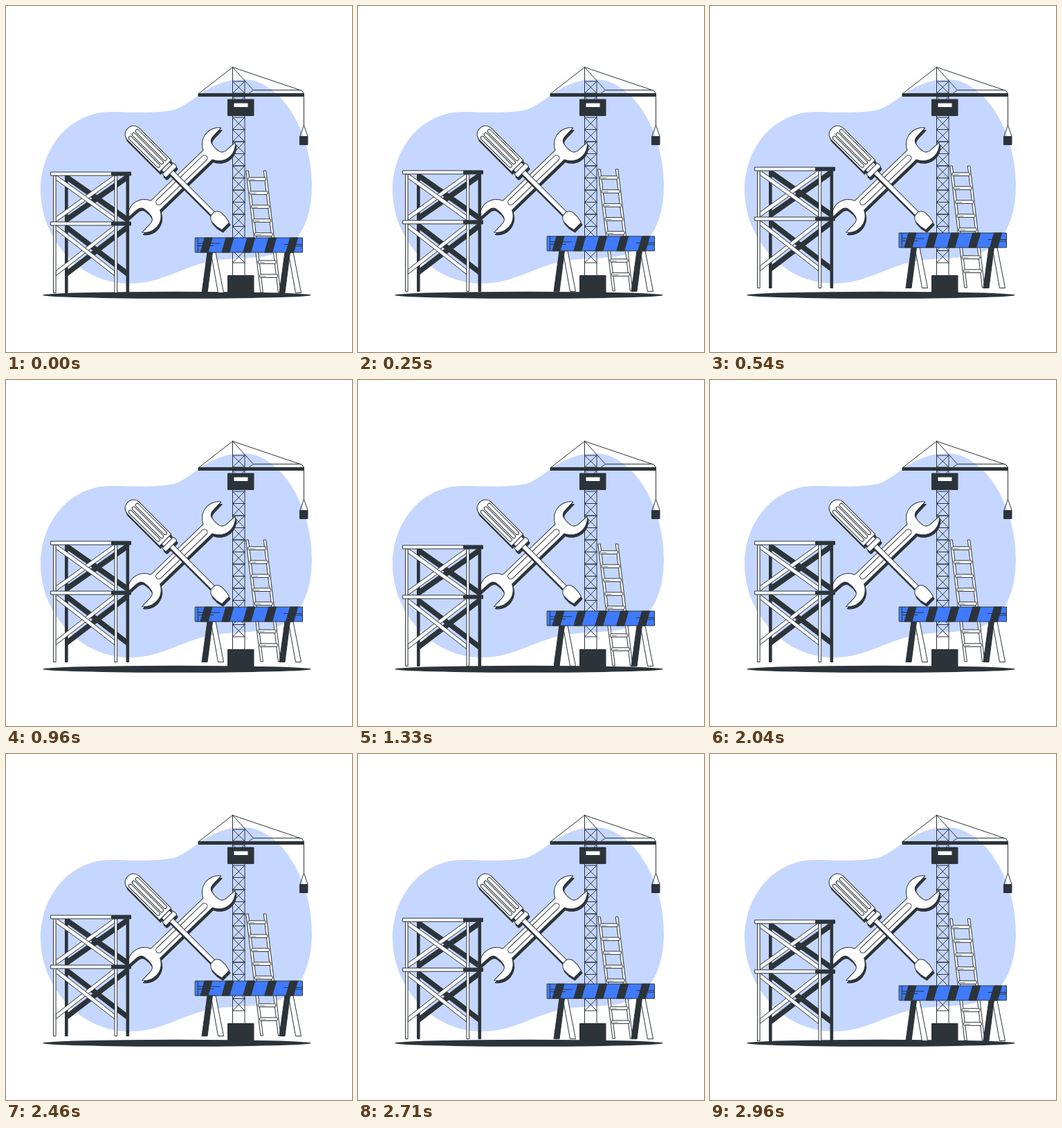
Animation, 500 px wide and 500 px high, one loop 3000 ms. Source, as an HTML page:

```html
<!DOCTYPE html>
<html lang="en">
<head>
<meta charset="utf-8">
<title>Construction site</title>
<style>
  html, body { margin: 0; width: 100%; height: 100%; overflow: hidden; background: #fff; }
  svg { display: block; width: 100vw; height: 100vh; }
  .line { fill: none; stroke: #2c343a; stroke-linejoin: round; stroke-linecap: round; }
  .white { fill: #fff; stroke: #2c343a; stroke-linejoin: round; }
  .dark { fill: #2c343a; stroke: #2c343a; stroke-linejoin: round; }
</style>
</head>
<body>
<svg viewBox="0 0 500 500">
  <path fill="#c5d7ff" d="M50 266C50 205 92 153 152 153C180 153 215 156 243 150C272 141 292 106 343 106C396 106 442 180 442 258C442 315 420 358 365 363C325 366 300 364 262 379C235 389 212 401 178 401C105 401 50 335 50 266Z"/>
  <ellipse cx="247" cy="417.8" rx="194" ry="5" fill="#2c343a"/>
  <g id="crane"></g>
  <g id="tools"></g>
  <g id="floating"></g>
</svg>
<script>
const PERIOD = 1500, LIFT = 8.5;
const byId = id => document.getElementById(id);

const path = (cls, d) => `<path class="${cls}" d="${d}"/>`;
const poly = (cls, ...pts) => path(cls, `M${pts.join('L')}Z`);
const line = (...pts) => path('line', `M${pts.join('L')}`);
const rect = (cls, x, y, w, h, r = 0) =>
  `<rect class="${cls}" x="${x}" y="${y}" width="${w}" height="${h}" rx="${r}"/>`;
const group = (transform, content) => `<g transform="${transform}">${content}</g>`;
const withShadow = (transform, draw) =>
  group(`translate(1.5 3.5) ${transform}`, draw('dark')) + group(transform, draw('white'));

function crane() {
  const left = 327.5, right = 345, step = 17.5;
  let out = line([left, 88], [left, 389]) + line([right, 108], [right, 389]);
  const bay = (top, bottom) =>
    line([left, top], [right, top]) + line([left, bottom], [right, bottom]) +
    line([left, top], [right, bottom]) + line([right, top], [left, bottom]);
  out += bay(109, 126);
  out += bay(131, 148);
  for (let i = 0; i < 12; i++) out += bay(161 + i * step, 161 + (i + 1) * step);
  out += line([278, 127], [327.5, 88.5], [428, 122.5], [430.5, 127]);
  out += line([327.5, 88.5], [357.5, 121.5], [426, 121.5]) + line([357.5, 121.5], [350, 127]);
  out += rect('dark', 278, 126.5, 152.5, 4);
  out += line([430.5, 131], [430.5, 172], [425, 188]) + line([430.5, 172], [436, 188]);
  out += rect('dark', 424.5, 188.5, 11.5, 12);
  out += rect('dark', 320.5, 135, 37.5, 23.5) + rect('white', 329, 140, 21, 6.5);
  return out + rect('dark', 320.5, 389.5, 37.5, 26);
}

function wrench() {
  // The second jaw is the first one turned by half a circle
  const jaw = s => [
    `L${52.5 * s} ${9.5 * s}A24 24 0 0 0 ${93.5 * s} ${14.7 * s}`,
    `L${78 * s} ${14 * s}Q${70 * s} ${14 * s} ${68 * s} ${8 * s}`,
    `L${67 * s} 0L${68 * s} ${-8 * s}Q${70 * s} ${-14 * s} ${78 * s} ${-14 * s}`,
    `L${93.5 * s} ${-14.7 * s}A24 24 0 0 0 ${52.5 * s} ${-9.5 * s}`
  ].join('');
  const outline = `M-52.5 9.5${jaw(1)}${jaw(-1)}Z`;
  return withShadow('translate(253.8 251.6) rotate(-44)', cls =>
    path(cls, outline) + rect(cls, -50, -4.2, 100, 8.4, 4.2));
}

function screwdriver() {
  return withShadow('translate(239.5 240.5) rotate(45)', cls => {
    let out = rect(cls, -2, -3.5, 88, 7) +
      path(cls, 'M84 -3.5Q87 -9 92 -9.5L101 -9.5L110 -7.5V7.5L101 9.5L92 9.5Q87 9 84 3.5Z') +
      rect(cls, -13, -8, 6, 16) + rect(cls, -8, -11.5, 7.5, 23, 2) +
      path(cls, 'M-13 12H-80Q-90 10 -90 0Q-90 -10 -80 -12H-13Z');
    for (const y of [-7, 0, 7]) out += rect(cls, -80, y - 2.4, 62, 4.8, 2.4);
    return out;
  });
}

function scaffold() {
  const brace = (cls, x, top, bottom, w) =>
    poly(cls, [x, bottom - w], [x, bottom], [x + 85, top + w], [x + 85, top]) +
    poly(cls, [x, top], [x, top + w], [x + 85, bottom], [x + 85, bottom - w]);
  const frame = (cls, x, w) =>
    brace(cls, x, 244, 312, w) + brace(cls, x, 316.5, 390, w) +
    rect(cls, x - 3.5, 245, 3.6, 169.5) + rect(cls, x + 85, 245, 3.6, 169.5);
  const bar = y => rect('white', 64.5, y, 88, 5) + rect('dark', 152.5, y, 28, 5);
  return frame('dark', 89, 8.5) + frame('white', 72, 7) + bar(240) + bar(312);
}

function ladder() {
  const railX = y => 346.8 + (y - 238) * 0.12;
  const rail = dx => poly('white', [railX(238) + dx, 238], [railX(238) + dx + 3.5, 238],
    [railX(414) + dx + 3.5, 414], [railX(414) + dx, 414]);
  let out = rail(0) + rail(25.5);
  for (let i = 0; i < 8; i++) {
    const y = 247.8 + i * 20, x = railX(y) + 2;
    out += rect('white', x, y, 25.5, 4.6, 0.8);
    out += `<g stroke-width=".6">${line([x + 2, y + 2.8], [x + 9, y + 2.8])}</g>`;
  }
  return out;
}

function barrier() {
  const legs = x =>
    poly('white', [x + 5, 356], [x + 12, 356], [x + 23.5, 414.5], [x + 15.5, 414.5]) +
    poly('dark', [x, 356], [x + 7.5, 356], [x, 414.5], [x - 8, 414.5]);
  let out = legs(291) + legs(403);
  out += '<rect x="273.5" y="335" width="155" height="21" fill="#407bff"/>';
  for (let i = 0; i < 5; i++) {
    const x = 281 + i * 30.9;
    out += poly('dark', [x, 356], [x + 11, 356], [x + 17, 335], [x + 6, 335]);
  }
  out += line([277.5, 335], [277.5, 356]) + line([277.5, 343], [309, 343]) +
    line([277.5, 346.5], [300, 346.5]) + line([402, 344.5], [428, 344.5]) + line([419, 347], [428, 347]);
  return out + rect('line', 273.5, 335, 155, 21);
}

byId('crane').innerHTML = crane();
byId('tools').innerHTML = wrench() + screwdriver();
byId('floating').innerHTML = scaffold() + ladder() + barrier();

// Smooth rise and fall
function render(time) {
  const lift = LIFT * (1 - Math.cos(2 * Math.PI * time / PERIOD)) / 2;
  byId('floating').setAttribute('transform', `translate(0 ${-lift})`);
}

const start = performance.now();
function tick() {
  render(performance.now() - start);
  requestAnimationFrame(tick);
}
render(0);
requestAnimationFrame(tick);
</script>
</body>
</html>
```
